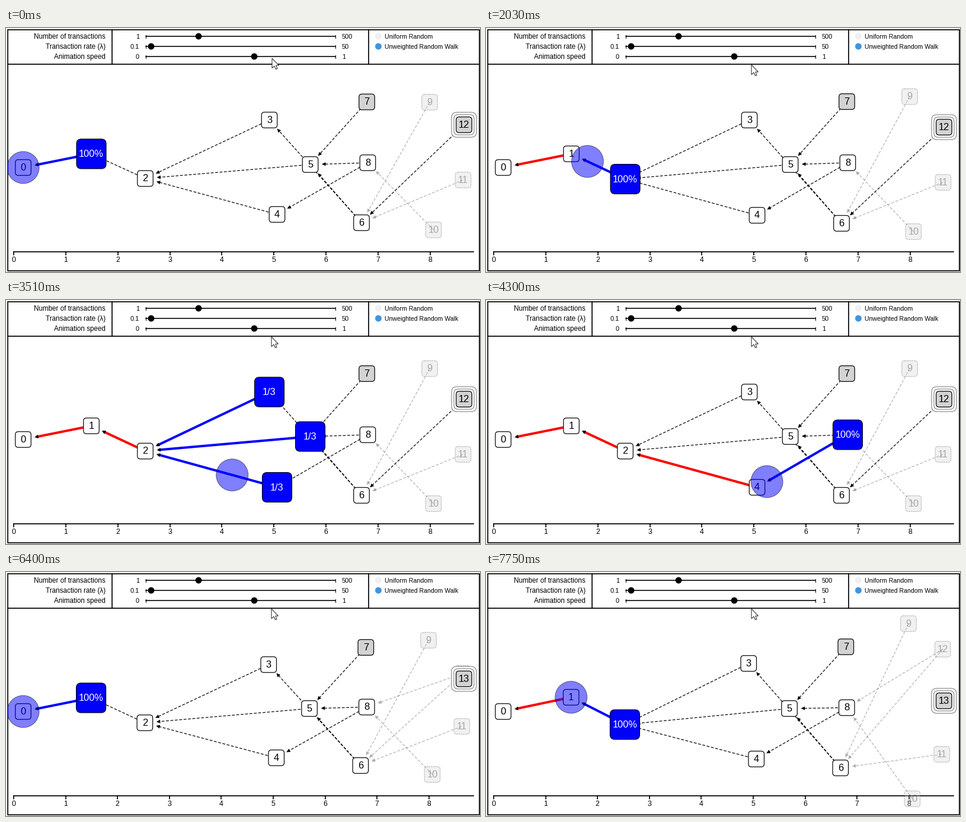
A matplotlib script for the animation above (8000 ms loop, 800x411 px).

```python
import numpy as np
import matplotlib.pyplot as plt
from matplotlib.animation import FuncAnimation
from matplotlib.lines import Line2D
from matplotlib.patches import Circle, FancyBboxPatch, Polygon, Rectangle

W, H, DPI = 800, 411, 64
PT = 72 / DPI                      # points per pixel
LOOP, INTERVAL = 8000, 40
FADE = 0.3

# Bursts of screen updates: start, end, number of updates
BURSTS = [(0, 80, 2), (320, 410, 2), (640, 1240, 9), (1870, 2490, 9),
          (3120, 3690, 8), (4300, 4840, 8), (6400, 7170, 11), (7260, 7750, 7)]
UPDATES = np.concatenate([np.linspace(*b) for b in BURSTS])

# Random walks: start times of the hops and the nodes they visit
HOP_TIME = 600
HOPS = [610, 1845, 3050, 4235]
PATH = [0, 1, 2, 4, 8]
SECOND_WALK, SECOND_HOPS = 6400, [7080]
NEXT = {0: [1], 1: [2], 2: [3, 5, 4], 4: [8], 8: []}

EDGES = [(1, 0), (2, 1), (3, 2), (4, 2), (5, 2), (6, 5), (6, 3), (7, 5),
         (8, 5), (8, 4), (9, 6), (10, 8), (11, 6), (12, 6), (12, 8)]

NODE_X = [29, 144, 235, 444.5, 457.5, 513.5, 600, 609, 610.5, 715, 721.5,
          771.5, 773, 775]
# Node heights while the layout relaxes, one row per key time
KEY_TIMES = [0, 410, 6400, 7170, 7750]
KEY_Y = np.array([
    [235, 212, 253.5, 155, 314, 230, 328, 124.5, 227, 125, 340, 256, 163, 0],
    [235, 212, 254.5, 155, 315.5, 230, 329, 124, 227, 115.5, 343, 260, 167, 0],
    [235, 212, 254, 156, 313, 230, 326, 127, 227.5, 115, 341, 260, 171, 180],
    [235, 211, 256, 157, 313, 230, 329, 127.5, 228.5, 87, 373, 299, 129, 213],
    [235, 211, 257, 154, 315, 230, 330, 126, 228.5, 87, 382, 307, 130, 217],
])

plt.rcParams["font.family"] = "Liberation Sans"
fig = plt.figure(figsize=(W / DPI, H / DPI), dpi=DPI, facecolor="white")
ax = fig.add_axes([0, 0, 1, 1])
ax.set_xlim(0, W)
ax.set_ylim(H, 0)
ax.axis("off")
live = []


def line(p, q, width=1.5, color="black", z=1, **kw):
    return ax.add_line(Line2D([p[0], q[0]], [p[1], q[1]], lw=width * PT,
                              color=color, zorder=z, **kw))


def label(x, y, text, size, ha="center", color="black", z=1, **kw):
    return ax.text(x, y + 0.36 * size, text, size=size * PT, ha=ha,
                   va="baseline", color=color, zorder=z, **kw)


def box(x, y, side, radius, z, **kw):
    r = side / 2 - radius
    patch = FancyBboxPatch((x - r, y - r), 2 * r, 2 * r, zorder=z,
                           boxstyle=f"round,pad={radius},rounding_size={radius}",
                           **kw)
    return ax.add_patch(patch)


def draw_header():
    ax.add_patch(Rectangle((3, 3), 795.5, 405.5, fill=False, lw=1.7 * PT, zorder=1))
    line((3, 61), (798, 61), 1.7)
    for x in (179, 612):
        line((x, 3), (x, 61), 1.7)
    sliders = [("Number of transactions", "1", "500", 325),
               ("Transaction rate (λ)", "0.1", "50", 245),
               ("Animation speed", "0", "1", 419)]
    for i, (name, low, high, knob) in enumerate(sliders):
        y = 14 + 17 * i
        label(168, y, name, 11.6, "right")
        label(225, y, low, 11, "right")
        label(567, y, high, 11, "left")
        line((236, y), (556, y), 1.6)
        for x in (236, 556):
            line((x, y - 2.5), (x, y + 2.5), 1)
        ax.add_patch(Circle((knob, y), 5.4, color="black", lw=0, zorder=2))
    ax.add_patch(Circle((628.5, 14), 5, fc="#f0f0f0", ec="#dcdcdc",
                        lw=0.8 * PT, ls=":"))
    ax.add_patch(Circle((628.5, 31), 5, fc="#3c96e6", ec="#4a8cc8", lw=0.8 * PT))
    label(639, 14, "Uniform Random", 10.6, "left")
    label(639, 31, "Unweighted Random Walk", 10.5, "left")


def draw_cursor(t):
    shape = np.array([(0, 0), (0, 16.5), (4, 13), (6.5, 18.5), (9, 17.5),
                      (6.8, 12), (11.5, 12)])
    x = np.interp(t, [230, 410], [449, 448])
    y = np.interp(t, [230, 410], [51, 62])
    live.append(ax.add_patch(Polygon(shape + (x, y), fc="white", ec="#222222",
                                     lw=PT, zorder=30)))


def draw_axis(step):
    live.append(line((13, 377), (789, 377), 1.7))
    for i in range(9):
        x = 13 + step * i
        live.append(line((x, 377), (x, 382), 1.7))
        live.append(label(x, 390, str(i), 12.3))


def layout(t, scale):
    i = max(k for k, key in enumerate(KEY_TIMES) if key <= t)
    if i in (1, 4):
        y = KEY_Y[i]
    else:
        u = (t - KEY_TIMES[i]) / (KEY_TIMES[i + 1] - KEY_TIMES[i])
        y = KEY_Y[i] + (KEY_Y[i + 1] - KEY_Y[i]) * (1 - (1 - u) ** 2)
    x = 13 + (np.array(NODE_X) - 13) * scale
    return np.column_stack([x, y])


def walk(t):
    """Number of finished hops and progress of the current one."""
    hops = HOPS if t < SECOND_WALK else SECOND_HOPS
    done = sum(t >= s + HOP_TIME for s in hops)
    part = 0
    if done < len(hops):
        part = max(0, (t - hops[done]) / HOP_TIME)
    return done, part


def draw_edge(p, q, style):
    d = (q - p) / np.hypot(*(q - p))
    tip = q - 19.5 * d
    side = 3.1 * np.array([-d[1], d[0]])
    alpha = FADE if style == "faded" else 1
    if style in ("red", "blue"):
        live.append(line(p, tip - 3 * d, 4, style, 4, solid_capstyle="butt"))
    else:
        live.append(line(p, tip - 5 * d, 1.2, z=3, alpha=alpha, ls=(0, (4, 2.2))))
    head = [tip, tip - 6.5 * d + side, tip - 6.5 * d - side]
    live.append(ax.add_patch(Polygon(head, color="black", lw=0, alpha=alpha,
                                     zorder=5)))


def draw_node(i, p, newest, share):
    x, y = p
    z = 10 + 0.1 * i
    if share:
        live.append(box(x, y, 50, 8, z, fc="blue", ec="black", lw=1.1 * PT))
        live.append(label(x, y - 0.7, share, 16.4, color="white", z=z + 0.05))
        return
    faded = 9 <= i < newest
    if i == newest:
        for side, r in ((42, 9), (34, 7)):
            live.append(box(x, y, side, r, z, fc="white", ec="#808080",
                            lw=1.1 * PT))
    fill = "#d3d3d3" if i == 7 or i >= 9 else "white"
    live.append(box(x, y, 26.5, 5, z + 0.02, fc=fill, ec="black", lw=1.2 * PT,
                    ls=(0, (1.5, 1)) if faded else "-",
                    alpha=FADE if faded else 1))
    live.append(label(x, y - 1, str(i), 16.5, z=z + 0.05,
                      alpha=FADE if faded else 1))


def draw(frame):
    while live:
        live.pop().remove()
    t = UPDATES[UPDATES <= frame * INTERVAL + 30][-1]
    second = t >= SECOND_WALK
    newest = 13 if second else 12
    scale = 701 / 703 if second else 1
    # The early nodes sit near the origin and barely shift with the scale
    pos = layout(t, scale)
    done, part = walk(t)
    here = PATH[done]
    choices = NEXT[here]
    red = set(zip(PATH[1:done + 1], PATH[:done]))

    draw_axis(87.85 * scale)
    for a, b in EDGES:
        if (a, b) == (12, 8) and not second and done < len(HOPS):
            continue
        style = "plain"
        if (a, b) in red:
            style = "red"
        elif b == here and a in choices:
            style = "blue"
        elif 9 <= a < newest:
            style = "faded"
        draw_edge(pos[a], pos[b], style)

    share = "1/3" if len(choices) == 3 else "100%"
    for i in range(newest + 1):
        draw_node(i, pos[i], newest, share if i in choices else None)

    centre = pos[here]
    if part:
        centre = centre + (pos[PATH[done + 1]] - centre) * part
    ball = ax.add_patch(Circle(centre, 27, fc="blue", ec="black", alpha=0.5,
                               lw=PT, zorder=20))
    ball.set_clip_path(Rectangle((3, 62), 795, 346, transform=ax.transData))
    live.append(ball)
    draw_cursor(t)


draw_header()
anim = FuncAnimation(fig, draw, frames=LOOP // INTERVAL, interval=INTERVAL,
                     init_func=lambda: None, repeat=True, repeat_delay=0,
                     blit=False, cache_frame_data=False)
plt.show()
```
